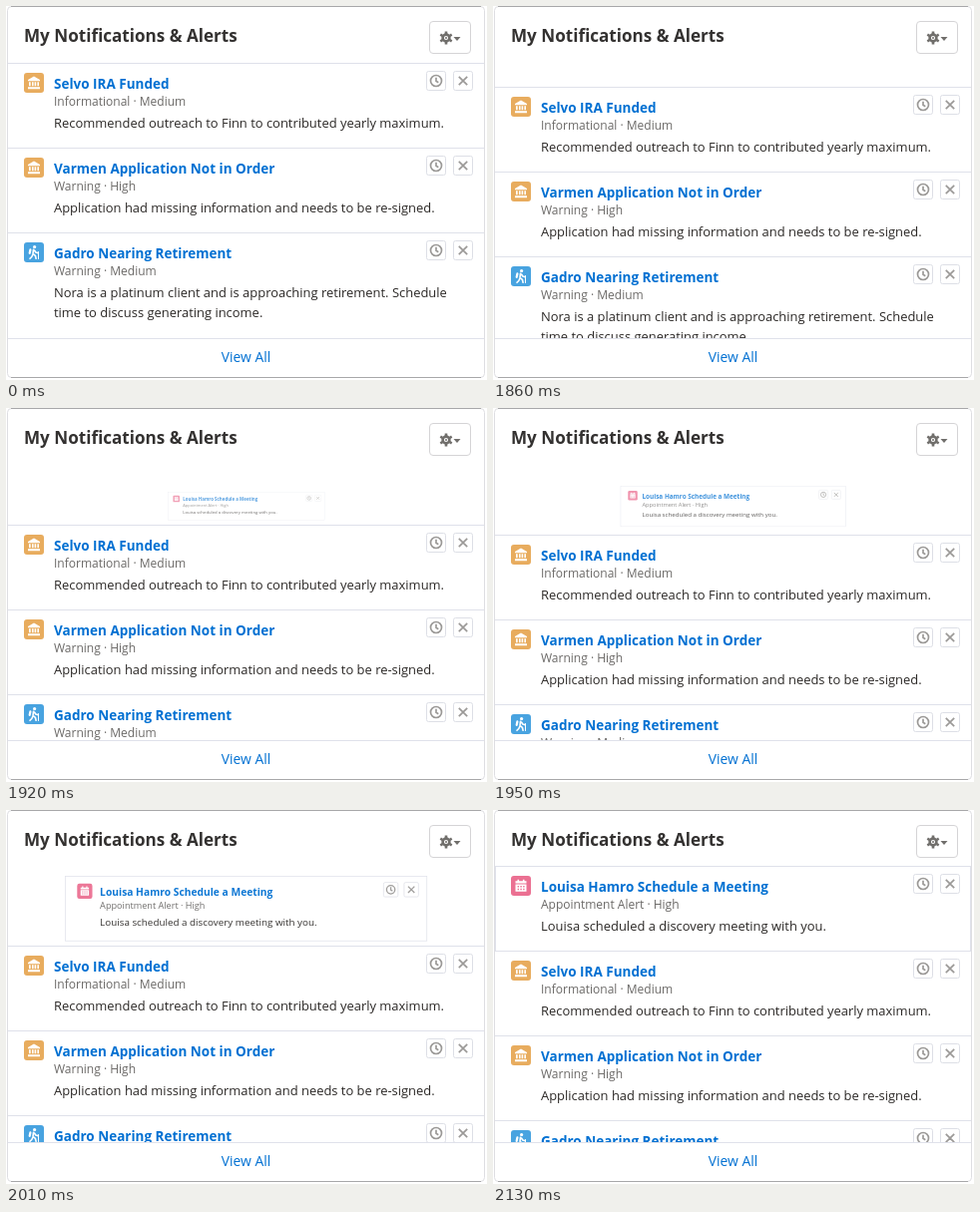
These frames come from a looping animation (482x375 px, 2700 ms). An HTML page:

```html
<!DOCTYPE html>
<html lang="en">
<head>
<meta charset="utf-8">
<title>Notifications</title>
<style>
  html, body { margin: 0; width: 482px; height: 375px; overflow: hidden; background: #fff; }
  svg { display: block; font-family: "Open Sans", "Noto Sans", sans-serif; }
  .heading { font-size: 17.1px; font-weight: 700; fill: #333130; }
  .title { font-size: 13.5px; font-weight: 700; fill: #0070d2; }
  .meta { font-size: 12px; font-weight: 450; fill: #6b6967; }
  .body { font-size: 12.95px; font-weight: 450; fill: #2b2826; }
  .more { font-size: 13.9px; font-weight: 500; fill: #0070d2; text-anchor: middle; }
  .rule { stroke: #dfe1ea; fill: none; }
  .button { fill: #fff; stroke: #dddfe6; }
  .glyph { fill: none; stroke: #9b9997; stroke-width: 1.7; }
</style>
</head>
<body>
<svg width="482" height="375" viewBox="0 0 482 375">
  <defs>
    <g id="bank">
      <rect width="20" height="20" rx="3" fill="#e8ac5e"/>
      <path fill="#fff" d="M10 3.5 16 7v1.3H4V7zM5 9.3h1.7v4H5zM8 9.3h1.6v4H8zM10.6 9.3h1.6v4h-1.6zM13.4 9.3H15v4h-1.6zM4 14.3h12v1.9H4z"/>
    </g>
    <g id="walker">
      <rect width="20" height="20" rx="3" fill="#48a3e0"/>
      <circle cx="10.6" cy="4.6" r="1.6" fill="#fff"/>
      <g fill="none" stroke="#fff" stroke-width="1.6" stroke-linecap="round" stroke-linejoin="round">
        <path d="M9.5 7.3 9 11.3l2.4 2 .7 3M8.7 12.5 7.8 14.5 6 16.3M10.5 8l1.3 2 1.8.6"/>
        <path d="M6.4 7.4 5.7 10.8" stroke-width="2.2"/>
        <path d="M14.5 9.5v7" stroke-width="1"/>
      </g>
    </g>
    <g id="calendar">
      <rect width="20" height="20" rx="3" fill="#eb7092"/>
      <path fill="#fff" d="M4.5 5.2h11v2.4h-11zM6.5 3.7h1.6v2H6.5zM11.9 3.7h1.6v2h-1.6zM4.5 8.5h11v7.3h-11z"/>
      <path stroke="#eb7092" stroke-width="1.4" stroke-dasharray="1.4 1.4" d="M6.6 10.7h7M6.6 13.5h7"/>
    </g>
    <g id="actions">
      <rect class="button" x="421.5" y="8.5" width="19" height="19" rx="2"/>
      <rect class="button" x="448.5" y="8.5" width="19" height="19" rx="2"/>
      <g class="glyph">
        <circle cx="431" cy="18" r="5.5"/>
        <path d="M431 14.7v3.6l2.3 1.5M453.8 13.8l8.4 8.4M462.2 13.8l-8.4 8.4"/>
      </g>
    </g>
    <clipPath id="area"><rect x="2" y="55" width="478" height="278"/></clipPath>
  </defs>

  <rect width="482" height="375" fill="#fff"/>
  <g clip-path="url(#area)">
    <g id="card"></g>
    <g id="list"></g>
  </g>

  <path class="rule" d="M2 333.5H480"/>
  <text class="more" x="240.5" y="357">View All</text>
  <text class="heading" x="18" y="36">My Notifications &amp; Alerts</text>
  <rect class="button" x="424.5" y="15.5" width="41" height="32" rx="3.5" style="stroke:#d5d4d6"/>
  <g transform="translate(441 32)" fill="none" stroke="#706e6b">
    <circle r="3.4" stroke-width="2.6"/>
    <path stroke-width="2.6" d="M0-4V-6.6M0 4V6.6M3.5-2 5.7-3.3M-3.5 2-5.7 3.3M3.5 2 5.7 3.3M-3.5-2-5.7-3.3"/>
    <circle r="1" fill="#706e6b" stroke="none"/>
  </g>
  <path fill="#706e6b" d="M448.5 31h7l-3.5 4z"/>
  <rect x="1.5" y=".5" width="478" height="372" rx="4" fill="none" stroke="#dedee2"/>
  <path d="M5 .5H476M5 372.5H476" stroke="#a8a8aa"/>
</svg>
<script>
  const LOOP = 2700, START = 1830, STEP = 30, ROW = 85;
  const slide = [3, 24, 47, 60, 70, 75, 79, 81, 83, 84, 84];
  const scale = [.02, .09, .2, .33, .474, .62, .761, .89, .985, 1, 1];
  const fade = [.15, .35, .55, .65, .75, .85, .95, 1, 1, 1, 1];

  const card = document.getElementById("card");
  const list = document.getElementById("list");

  const text = (kind, y, s) => `<text class="${kind}" x="48" y="${y}">${s}</text>`;

  const content = (icon, title, meta, ...lines) =>
    `<use href="#${icon}" x="18" y="10"/><use href="#actions"/>` +
    text("title", 26, title) + text("meta", 43, meta) +
    lines.map((s, i) => text("body", 65 + i * 20, s)).join("");

  const rows = [
    ["bank", "Selvo IRA Funded", "Informational · Medium",
      "Recommended outreach to Finn to contributed yearly maximum."],
    ["bank", "Varmen Application Not in Order", "Warning · High",
      "Application had missing information and needs to be re-signed."],
    ["walker", "Gadro Nearing Retirement", "Warning · Medium",
      "Nora is a platinum client and is approaching retirement. Schedule",
      "time to discuss generating income."]
  ];

  list.innerHTML = rows.map((row, i) =>
    `<g transform="translate(0 ${57 + i * ROW})">
      <rect x="2" width="478" height="${i < 2 ? ROW : 110}" fill="#fff"/>
      <path class="rule" d="M2 .5H480"/>${content(...row)}
    </g>`).join("");

  card.innerHTML = `<g transform="translate(0 56)">
    <rect class="rule" x="2.5" y=".5" width="476" height="85"/>` +
    content("calendar", "Louisa Hamro Schedule a Meeting", "Appointment Alert · High",
      "Louisa scheduled a discovery meeting with you.") + "</g>";

  function draw(now) {
    const t = now % LOOP;
    const k = Math.min(10, Math.floor((t - START) / STEP));
    const shown = k >= 0;
    list.setAttribute("transform", `translate(0 ${shown ? slide[k] : 0})`);
    card.style.display = shown ? "" : "none";
    if (shown) {
      card.setAttribute("transform", `translate(241 98.5) scale(${scale[k]}) translate(-241 -98.5)`);
      card.setAttribute("opacity", fade[k]);
    }
  }

  const origin = performance.now();
  function tick() {
    draw(performance.now() - origin);
    requestAnimationFrame(tick);
  }
  tick();
</script>
</body>
</html>
```
